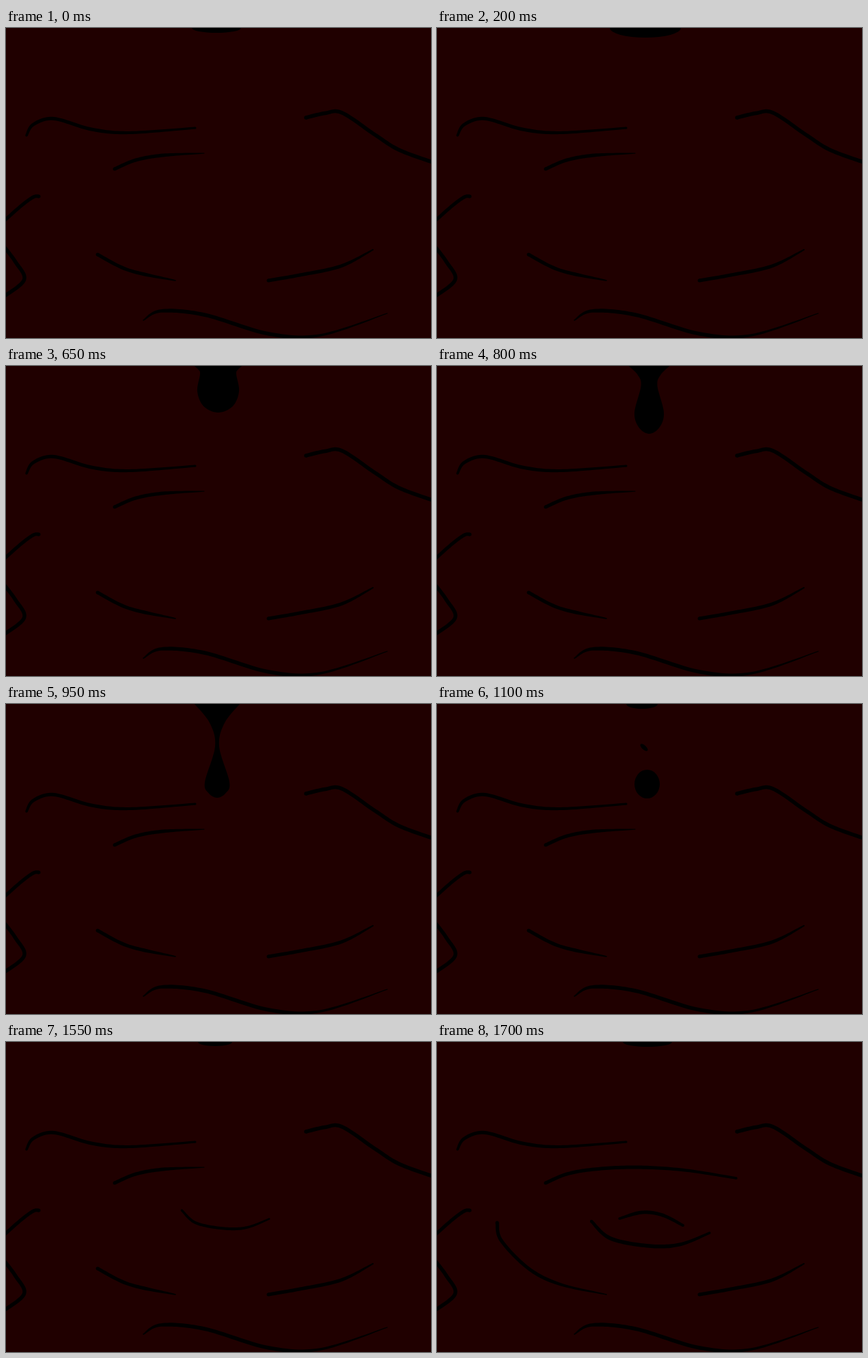
Recreate the animation shown at these times as an HTML page with a canvas. Size 622 by 453 pixels, loop 1.85 s.

```html
<!DOCTYPE html>
<html lang="en">
<head>
<meta charset="utf-8">
<title>Drip</title>
<style>
  html, body { margin: 0; width: 100%; height: 100%; overflow: hidden; background: #200000; }
  canvas { display: block; }
</style>
</head>
<body>
<canvas id="stage" width="622" height="453"></canvas>
<script>
const ctx = document.getElementById('stage').getContext('2d');
const LOOP = 1850, FIRST = 200, STEP = 150, STEPS = 16;
const lerp = (a, b, t) => a + (b - a) * t;

// Catmull-Rom curve through the points
function spline(points) {
  const last = points.length - 1, out = [];
  const at = i => points[Math.min(last, Math.max(0, i))];
  for (let i = 0; i < last * STEPS; i++) {
    const k = Math.floor(i / STEPS), t = i / STEPS - k;
    out.push([0, 1].map(j => {
      const [a, b, c, d] = [-1, 0, 1, 2].map(o => at(k + o)[j]);
      return b + t * (c - a + t * (2 * a - 5 * b + 4 * c - d + t * (3 * (b - c) + d - a))) / 2;
    }));
  }
  return [...out, points[last]];
}

function fill(path) {
  ctx.beginPath();
  path.forEach(([x, y]) => ctx.lineTo(x, y));
  ctx.fill();
}

function oval(x, y, rx, ry = rx, angle = 0) {
  ctx.beginPath();
  ctx.ellipse(x, y, rx, ry, angle, 0, 2 * Math.PI);
  ctx.fill();
}

// Ink line that narrows towards its ends to the shares head and tail of its width
function brush(points, head = 1, tail = 1, width = 5) {
  const path = spline(points), end = path.length - 1;
  const radius = i => width / 2 *
    lerp(head, 1, Math.min(1, i / end * 4)) * lerp(tail, 1, Math.min(1, (1 - i / end) * 3));
  const side = sign => path.map(([x, y], i) => {
    const [ax, ay] = path[Math.max(0, i - 1)], [bx, by] = path[Math.min(end, i + 1)];
    const scale = sign * radius(i) / Math.hypot(bx - ax, by - ay);
    return [x - (by - ay) * scale, y + (bx - ax) * scale];
  });
  fill([...side(1), ...side(-1).reverse()]);
  oval(...path[0], radius(0));
  oval(...path[end], radius(end));
}

// Rounded ink at the top edge
const bead = (x, half, depth) => oval(x, 0, half, depth);

// Ink sagging from the top edge: a funnel, a neck and a round bulb
function hang(x, top, neck, neckY, bulb, bulbY, depth) {
  const half = [
    [top, -1], [lerp(top, neck, 0.75), neckY * 0.45], [neck, neckY],
    [bulb, bulbY], [bulb * 0.7, lerp(bulbY, depth, 0.7)]
  ];
  fill(spline([
    ...half.map(([dx, y]) => [x - dx, y]), [x, depth],
    ...half.reverse().map(([dx, y]) => [x + dx, y])
  ]));
}

// Free drop with a small droplet behind it, gaining speed with each step
function fall(step) {
  const speedUp = 3 * step * step;
  bead(300 + 2.8 * step, 23 - 2 * step, 7 - 0.7 * step);
  oval(303 + 3 * step, 63.5 + 19 * step + speedUp, 7 - step, 3 - step / 2, 0.75);
  oval(307.5 + 2 * step, 117 + 12 * step + speedUp, 18.5 - 1.3 * step, 21);
}

function pool() {
  brush([[30, 157], [40, 141], [70, 132.5], [125, 148], [180, 153], [277, 146]], 0.7, 0.6);
  brush([[439, 131], [467, 124.5], [492, 124], [540, 156], [575, 178], [624, 196]], 1, 1, 5.5);
  brush([[48, 246], [40, 247], [22, 260], [-4, 283]]);
  brush([[-4, 318], [14, 342], [26.5, 368], [-4, 393]], 1, 1, 5.5);
  brush([[384, 369], [430, 361], [490, 348], [537, 324]], 1, 0.4);
  brush([[201, 427], [227, 413.5], [290, 419], [385, 447], [460, 449], [558, 417]], 0.3, 0.2, 5.5);
}

function rings(wide) {
  const upper = [[159, 206], [190, 193], [230, 186], [290, 183], [360, 187], [438, 199]];
  const lower = [[88, 264], [94, 290], [134, 331], [180, 354], [248, 369]];
  brush(wide ? upper : upper.slice(0, 4), 1, wide ? 0.7 : 0.2);
  brush(wide ? lower : lower.slice(2), 1, 0.3);
}

const ripple = () =>
  brush([[226, 262], [254, 287], [310, 298], [355, 296], [399, 279]], 0.8, 0.6, 5.5);

function firstRipple() {
  ctx.save();
  ctx.translate(90, 52);
  ctx.scale(0.74, 0.74);
  ripple();
  ctx.restore();
}

const rest = () => bead(308, 36, 7);

const poses = [
  rest,
  () => bead(305, 52, 14),
  () => bead(310, 55, 32),
  () => hang(309.5, 46, 35, 16, 35, 34, 56),
  () => hang(310.5, 36, 26.5, 12, 30.5, 37, 68),
  () => hang(310.5, 31, 12, 29, 21.5, 68, 99),
  () => hang(309, 34, 3, 62, 18, 114, 137),
  () => fall(0),
  () => fall(1),
  () => fall(2),
  () => { bead(306, 25, 6); firstRipple(); },
  () => {
    rest();
    ripple();
    brush([[267, 258], [300, 249], [330, 253], [360, 268]], 0.7, 0.8);
  }
];

function draw(now) {
  const time = now % LOOP;
  const pose = time < FIRST ? 0 : 1 + Math.floor((time - FIRST) / STEP);
  ctx.fillStyle = '#200000';
  ctx.fillRect(0, 0, 622, 453);
  ctx.fillStyle = '#000';
  pool();
  rings(pose === poses.length - 1);
  poses[pose]();
}

const start = performance.now();
function tick() {
  draw(performance.now() - start);
  requestAnimationFrame(tick);
}
tick();
</script>
</body>
</html>
```
